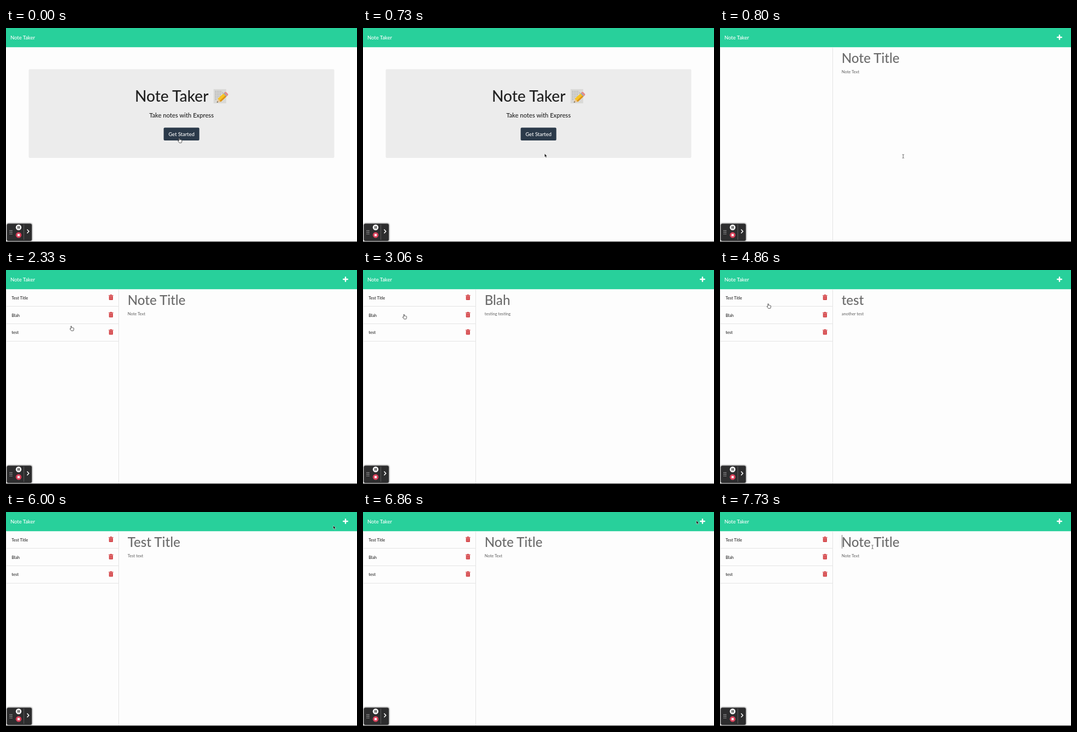
Animation, 640 px wide and 392 px high, one loop 8 s. Source, as an HTML page:

```html
<!DOCTYPE html>
<html lang="en">
<head>
<meta charset="utf-8">
<title>Note Taker</title>
<style>
  html, body { margin: 0; width: 100%; height: 100%; overflow: hidden; background: #fdfdfd; }
  svg { display: block; width: 640px; height: 392px; font-family: Lato, sans-serif; font-weight: 500; }
  .item { font-size: 7.52px; fill: #222; }
  .line { stroke: #e4e4e4; }
</style>
</head>
<body>
<svg viewBox="0 0 640 392">
  <defs>
    <g id="trash" fill="#d23c40">
      <path d="M-4.2-4h2.4l.6-1h2.4l.6 1H4.2v1.2h-8.4z"/>
      <path d="M-3.6-2.3h7.2V4q0 1-1 1h-5.2q-1 0-1-1z"/>
      <path d="M-1.7-1V3.8M0-1V3.8M1.7-1V3.8" stroke="#eeb5b5" stroke-width=".5"/>
    </g>
    <filter id="glow" x="-20%" y="-20%" width="140%" height="140%">
      <feGaussianBlur stdDeviation="1"/>
    </filter>
  </defs>
  <rect width="640" height="392" fill="#fdfdfd"/>
  <rect width="640" height="35.2" fill="#28d09b"/>
  <text x="8" y="20.8" font-size="9.4" fill="#fff">Note Taker</text>

  <g id="home">
    <rect x="41.5" y="75.5" width="557" height="162.5" rx="2" fill="#ececec"/>
    <g fill="#212121">
      <text x="235" y="134.7" font-size="28.07">Note Taker</text>
      <text x="320" y="163.8" font-size="11.2" text-anchor="middle">Take notes with Express</text>
    </g>
    <rect x="378.5" y="112" width="23" height="26" fill="#d9d9d7"/>
    <path d="M381 116h13M381 119h15M381 122h12M381 125h10M381 128h6M381 131h4" stroke="#999" stroke-width=".8" stroke-dasharray="3 1"/>
    <g transform="translate(384.5 136.5) rotate(-43)">
      <path d="M0 0L6-4V4z" fill="#e8c79a"/>
      <path d="M0 0L2-1.3V1.3z" fill="#333"/>
      <path d="M6-4H20V4H6z" fill="#f7c325"/>
      <path d="M6 1.2H20V4H6z" fill="#dc921a"/>
      <path d="M20-4h2V4h-2z" fill="#9aa5ad"/>
      <path d="M22-4h1.5q2 0 2 2v4q0 2-2 2H22z" fill="#e58a8a"/>
    </g>
    <rect x="287.5" y="182.5" width="65" height="23.5" rx="2" fill="#2b3a4a"/>
    <text x="320" y="197.6" font-size="9.4" text-anchor="middle" fill="#fff">Get Started</text>
  </g>

  <g id="notes">
    <path d="M615.2 17h7.6M619 13.2v7.6" stroke="#fff" stroke-width="2.4" stroke-linecap="round"/>
    <path class="line" d="M.5 36V391M205.5 36V391"/>
    <g id="list"></g>
    <g fill="#6c6c6c">
      <text id="noteTitle" x="221.7" y="63.9" font-size="24.1"></text>
      <text id="noteText" x="221.8" y="82.8" font-size="7.52"></text>
    </g>
    <path id="caret" d="M222.5 42V67" stroke="#777"/>
  </g>

  <rect y="391" width="640" height="1" fill="#333"/>
  <g id="recorder">
    <rect x="1" y="357.5" width="47" height="33.5" rx="4" fill="#888" filter="url(#glow)"/>
    <rect x="1.5" y="358.5" width="45.5" height="31.5" rx="3" fill="#2d2d2e"/>
    <path d="M7.5 370.5v8M10.5 370.5v8" stroke="#ccc" stroke-width="1.4" stroke-dasharray="1.4 1.7"/>
    <circle cx="23" cy="365.3" r="5.2" fill="#f2f2f2"/>
    <path d="M21.8 363v4.6M24.3 363v4.6" stroke="#222" stroke-width="1.3"/>
    <circle cx="23" cy="379.3" r="5.2" fill="#d9405a"/>
    <rect x="21" y="377.3" width="4" height="4" fill="#fff"/>
    <path d="M32.5 360v28" stroke="#666" stroke-width=".8"/>
    <path d="M38.5 369l3.2 3.5l-3.2 3.5" fill="none" stroke="#fff" stroke-width="1.5"/>
  </g>

  <g id="cursor">
    <path id="hand" d="M-1.8-4q1-.7 1.5.3V-1.3q1-.5 1.6.1q.9-.4 1.4.3q1-.1 1 .8V2L2.8 4.3H-1L-3.5 1q-.1-1.2 1.7-.3z" fill="#fff" stroke="#333" stroke-width=".8"/>
    <path id="arrow" d="M-2.2-3.7V2.5L-.8 1.4L.3 3.8L1.5 3.2L.5 1H2.4z" fill="#111" stroke="#fff" stroke-width=".5"/>
    <path id="beam" d="M-1.6-3.4Q0-3.4 0-2.4Q0-3.4 1.6-3.4M0-2.4V2.4M-1.6 3.4Q0 3.4 0 2.4Q0 3.4 1.6 3.4" fill="none" stroke="#444" stroke-width=".8"/>
  </g>
</svg>
<script>
const DURATION = 8000, PAGE_OPEN = 795, LIST_LOADED = 930, TITLE_FOCUSED = 7530;
const $ = id => document.getElementById(id);
const show = (id, visible) => { $(id).style.display = visible ? "" : "none"; };

// Each entry: start time, title, body.
const notes = [
  [0, "Note Title", "Note Text"],
  [2830, "Blah", "testing testing"],
  [4100, "test", "another test"],
  [5180, "Test Title", "Test text"],
  [6720, "Note Title", "Note Text"]
];

// Each entry: time, x, y of the pointer.
const path = [
  [0, 317, 206], [380, 317, 206], [780, 334, 235], [930, 334, 235],
  [1730, 274, 155], [1930, 128, 110], [2130, 128, 110], [2330, 120, 107],
  [2700, 78, 86], [3000, 76, 85], [3800, 68, 119.5], [4200, 66, 118],
  [4860, 89, 66], [5100, 84, 54], [5400, 86, 53], [6000, 599, 28.5],
  [6400, 631, 8], [6620, 620, 18], [6800, 620, 18], [7400, 277, 62],
  [7730, 278, 64], [DURATION, 278, 64]
];

$("list").innerHTML = ["Test Title", "Blah", "test"].map((name, i) => {
  const y = 50 + i * 31.8;
  return `<text class="item" x="10.3" y="${y + 3.8}">${name}</text>
    <use href="#trash" x="191.4" y="${y}"/>
    <path class="line" d="M0 ${Math.floor(y + 16.8) + .5}H205"/>`;
}).join("");

function pointerAt(time) {
  const next = Math.max(1, path.findIndex(p => p[0] > time));
  const [t0, x0, y0] = path[next - 1], [t1, x1, y1] = path[next];
  const u = (time - t0) / (t1 - t0), ease = u * u * (3 - 2 * u);
  return [x0 + (x1 - x0) * ease, y0 + (y1 - y0) * ease];
}

function pointerKind(x, y, home) {
  if (home) return y < 210 ? "hand" : "arrow";
  if (y < 36) return Math.hypot(x - 619, y - 17) < 9 ? "hand" : "arrow";
  if (x > 214) return "beam";
  return x < 205 && y < 131 ? "hand" : "arrow";
}

function draw(now) {
  const time = now % DURATION, home = time < PAGE_OPEN;
  show("home", home);
  show("notes", !home);
  show("list", time >= LIST_LOADED);
  show("caret", time >= TITLE_FOCUSED);

  const [, title, body] = notes.filter(n => n[0] <= time).pop();
  $("noteTitle").textContent = title;
  $("noteText").textContent = body;

  const [x, y] = pointerAt(time), kind = pointerKind(x, y, home);
  $("cursor").setAttribute("transform", `translate(${x} ${y})`);
  for (const k of ["hand", "arrow", "beam"]) show(k, k === kind);
}

const start = performance.now();
function tick() {
  draw(performance.now() - start);
  requestAnimationFrame(tick);
}
tick();
</script>
</body>
</html>
```
